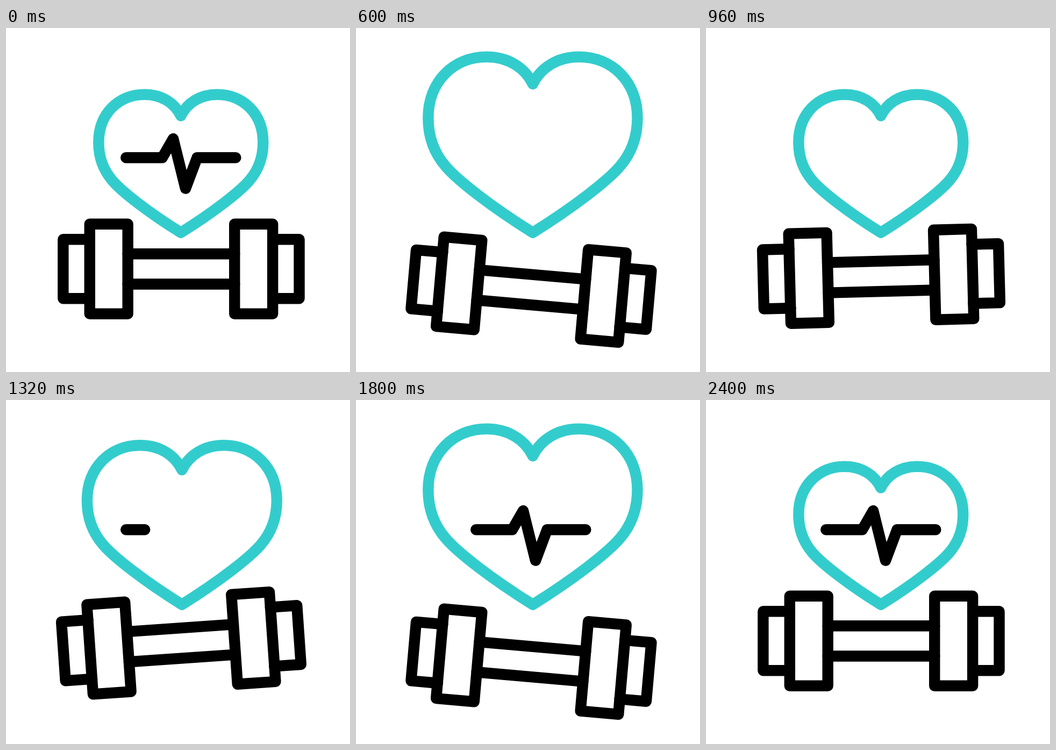
An HTML page with a canvas for the animation above (2420 ms loop, 640 px wide and 640 px high).

```html
<!DOCTYPE html>
<html lang="en">
<head>
<meta charset="utf-8">
<title>Heart and dumbbell</title>
<style>
  html, body { margin: 0; width: 100%; height: 100%; overflow: hidden; background: #fff; }
  canvas { display: block; width: 640px; height: 640px; }
</style>
</head>
<body>
<canvas id="stage" width="640" height="640"></canvas>
<script>
const ctx = document.getElementById('stage').getContext('2d');
const LOOP = 2420, STEP = 20, BEAT = 600;
const BLACK = '#000', TEAL = '#33cccc';

const mix = (a, b, k) => a + (b - a) * k;
const progress = (t, start, length) => Math.min(1, Math.max(0, (t - start) / length));
const smooth = x => x * x * (3 - 2 * x);

// Cubic bezier (0, 0, 0.1, 1): a sudden start with a long settle.
function burst(x) {
  let low = 0, high = 1;
  for (let i = 0; i < 30; i++) {
    const s = (low + high) / 2;
    if (0.3 * s * s * (1 - s) + s ** 3 < x) low = s; else high = s;
  }
  return smooth(high);
}

// Eased value through keys spaced one beat apart.
function keyed(t, keys) {
  const i = Math.min(keys.length - 2, Math.floor(t / BEAT));
  return mix(keys[i], keys[i + 1], smooth(progress(t, i * BEAT, BEAT)));
}

function line(points) {
  ctx.beginPath();
  points.forEach(([x, y]) => ctx.lineTo(x, y));
  ctx.stroke();
}

function drawHeart(t) {
  const local = t >= 2400 ? 1200 : t % 1200;
  const swell = local < 600
    ? burst(progress(local, 0, 600))
    : 1 - smooth(progress(local, 600, 300));
  const scale = mix(1, 1.272, swell);
  const axis = mix(325.3, 328.9, swell);

  // Half outlines relative to the bottom tip, mirrored about the axis.
  const half = [
    [0, -217.4],
    [-11.3, -240.7, -35.3, -257, -67.3, -257],
    [-116.3, -257, -153, -220.7, -153, -167.7],
    [-153, -140.7, -145.3, -117.7, -127.3, -96.7],
    [-109.3, -75.7, -60.3, -37.7, 0, 0]
  ];
  ctx.strokeStyle = TEAL;
  ctx.beginPath();
  for (const side of [1, -1]) {
    const place = p => p.map((v, i) => i % 2 ? 380.7 + v * scale : axis + v * scale * side);
    ctx.moveTo(...place(half[0]));
    half.slice(1).forEach(p => ctx.bezierCurveTo(...place(p)));
  }
  ctx.stroke();
}

const pulse = [[223.2, 241.3], [290.7, 241.3], [311, 206], [334, 298.6], [355.5, 241.3], [427.4, 241.3]];
const pulseLength = pulse.slice(1).reduce(
  (sum, [x, y], i) => sum + Math.hypot(x - pulse[i][0], y - pulse[i][1]), 0);

function drawPulse(t) {
  const from = t < 1200 ? smooth(progress(t, 0, BEAT)) : 0;
  const to = t < 1200 ? 1 : smooth(progress(t, 1200, BEAT));
  if (to - from < 1e-4) return;
  ctx.strokeStyle = BLACK;
  if (to - from < 1) {
    ctx.setLineDash([(to - from) * pulseLength, 2 * pulseLength]);
    ctx.lineDashOffset = -from * pulseLength;
  }
  line(pulse);
  ctx.setLineDash([]);
}

function drawDumbbell(t) {
  ctx.save();
  ctx.translate(325.95, 448.3 + keyed(t, [0, 38.5, 0, 38.5, 0]));
  ctx.rotate(keyed(t, [0, 5, -5, 5, 0]) * Math.PI / 180);
  ctx.strokeStyle = BLACK;
  for (const side of [-1, 1]) {
    ctx.strokeRect(side < 0 ? -170.2 : 99.3, -83.6, 70.9, 167.1);
    line([[170 * side, -55], [219.6 * side, -55], [219.6 * side, 55], [170 * side, 55]]);
  }
  for (const y of [-28.1, 28.2]) line([[-99.3, y], [99.3, y]]);
  ctx.restore();
}

function draw(now) {
  const t = Math.floor((now % LOOP) / STEP) * STEP;
  ctx.fillStyle = '#fff';
  ctx.fillRect(0, 0, 640, 640);
  ctx.lineWidth = 20.4;
  ctx.lineCap = ctx.lineJoin = 'round';
  drawHeart(t);
  drawPulse(t);
  drawDumbbell(t);
}

function tick() {
  draw(performance.now());
  requestAnimationFrame(tick);
}
draw(0);
requestAnimationFrame(tick);
</script>
</body>
</html>
```
